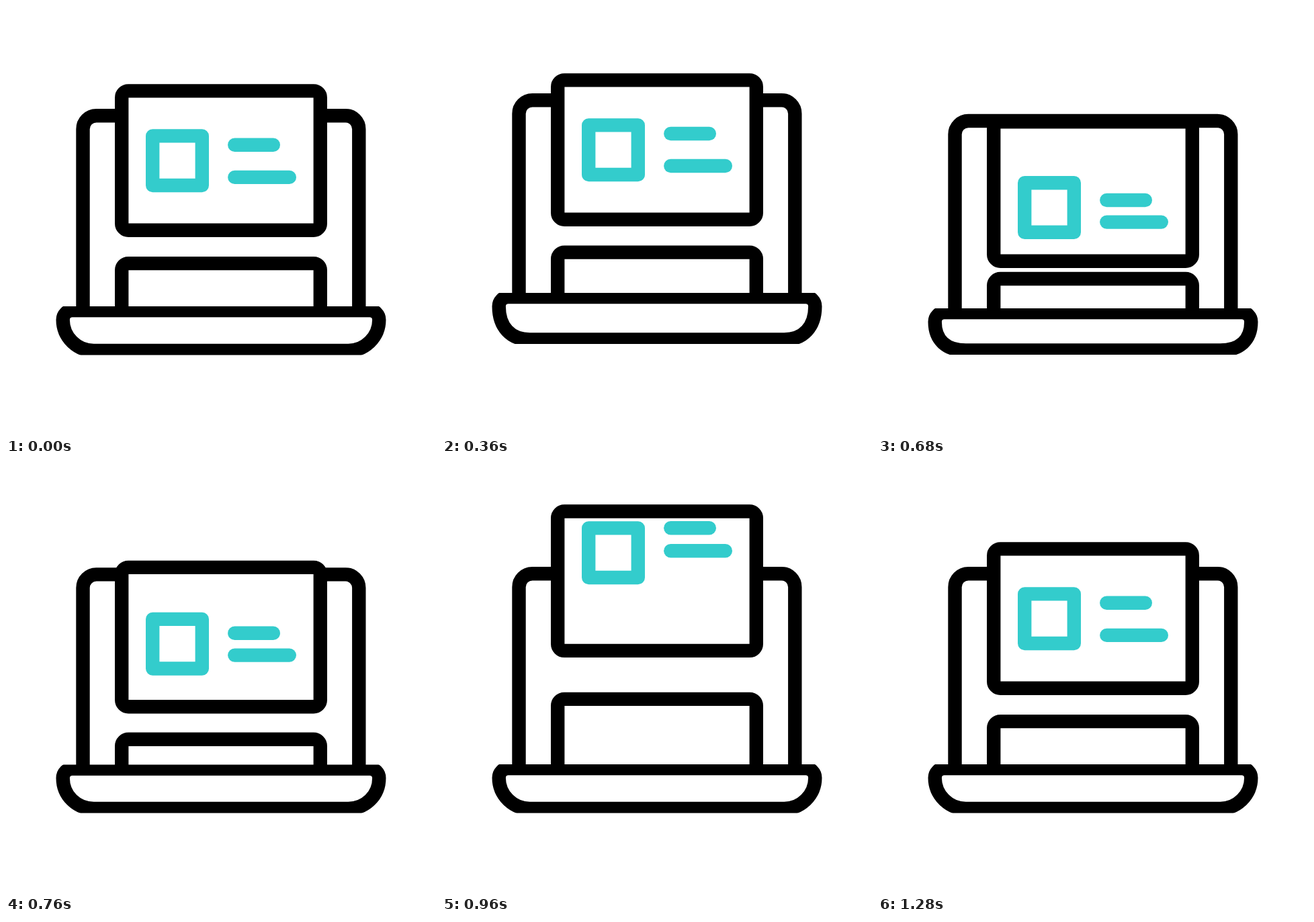
Write an HTML page that moves like this. It is 640x640 px and loops after 2000 ms.

```html
<!DOCTYPE html>
<html lang="en">
<head>
<meta charset="utf-8">
<title>Laptop card</title>
<style>
  html, body { margin: 0; width: 100%; height: 100%; overflow: hidden; background: #fff; }
  svg { display: block; width: 100%; height: 100%; }
  .ink { fill: #fff; stroke: #000; stroke-width: 20.4; }
  .hue { fill: none; stroke: #33cccc; stroke-width: 20.4; stroke-linecap: round; stroke-linejoin: round; }
</style>
</head>
<body>
<svg viewBox="0 0 640 640">
  <clipPath id="cut"><rect id="band" x="60" width="520"/></clipPath>
  <path id="screen" class="ink"/>
  <path id="tray" class="ink"/>
  <rect id="card" class="ink" x="172.2" width="295.6" height="207.4" rx="10"/>
  <rect id="box" class="hue" x="218.2" width="73.6" height="73.6"/>
  <path id="line1" class="hue"/>
  <path id="line2" class="hue"/>
  <g clip-path="url(#cut)"><path id="base" class="ink"/></g>
</svg>
<script>
const LOOP = 2000, STEP = 40, HALF = 10.2;

// Each move eases from its start to its end: hop, land, (spring up,) settle
const hop = [120, 360];
const laptop = [hop, [360, 560], [560, 800]];
const sheet = [hop, [360, 655], [680, 975], [975, 1280]];
const content = [hop, [360, 655], [680, 965], [965, 1280]];
const drawer = [hop, [360, 750], [780, 1060], [1060, 1280]];

function ease(u) {
  u = Math.min(1, Math.max(0, u));
  return u * u * (3 - 2 * u);
}

// Goes from rest through the stops and back to rest
const track = (moves, rest, ...stops) => t => moves.reduce(
  (y, [from, to], i) => y + ((stops[i] ?? rest) - y) * ease((t - from) / (to - from)), rest);

const motion = {
  screen: track(laptop, 153, 130, 168.7),
  top: track(laptop, 447, 427, 453),
  bottom: track(laptop, 519.5, 503, 518.5),
  bend: track(laptop, .552, .62, .72),
  card: track(sheet, 116.2, 100.2, 162.2, 59.5),
  box: track(content, 183.2, 167.2, 253, 85),
  line1: track(content, 206.8, 190, 289, 95),
  line2: track(content, 254.9, 238, 321.6, 129),
  tray: track(drawer, 372.9, 356.4, 399.5, 315)
};

const set = (id, name, value) => document.getElementById(id).setAttribute(name, value);

// Open frame with rounded upper corners
const arch = (x0, x1, y, r, foot) =>
  `M${x0} ${foot}V${y + r}a${r} ${r} 0 0 1 ${r} ${-r}H${x1 - r}a${r} ${r} 0 0 1 ${r} ${r}V${foot}`;

// Closed tray whose lower corners get squarer as bend grows
function tub(top, bottom, bend) {
  const y0 = top + 6, y1 = bottom - 6.5, mid = y0 + 14;
  const w = 46, dy = (y1 - mid) * bend, dx = w * bend, L = 84.7, R = 555.3;
  return `M${L + 14} ${y0}H${R - 14}A14 14 0 0 1 ${R} ${mid}`
    + `C${R} ${mid + dy} ${R - w + dx} ${y1} ${R - w} ${y1}H${L + w}`
    + `C${L + w - dx} ${y1} ${L} ${mid + dy} ${L} ${mid}A14 14 0 0 1 ${L + 14} ${y0}Z`;
}

function draw(t) {
  const v = {};
  for (const name in motion) v[name] = motion[name](t);
  const foot = v.top + 6;
  set('screen', 'd', arch(114.5, 525.3, v.screen + HALF, 20, foot));
  set('tray', 'd', arch(172.2, 467.8, v.tray + HALF, 10, foot));
  set('card', 'y', v.card + HALF);
  set('box', 'y', v.box + HALF);
  set('line1', 'd', `M340.3 ${v.line1}H397.8`);
  set('line2', 'd', `M340.3 ${v.line2}H421.8`);
  set('base', 'd', tub(v.top, v.bottom, v.bend));
  set('band', 'y', v.top);
  set('band', 'height', v.bottom - v.top);
}

const start = performance.now();
function tick() {
  const t = (performance.now() - start) % LOOP;
  draw(Math.floor(t / STEP) * STEP);
  requestAnimationFrame(tick);
}
tick();
</script>
</body>
</html>
```
